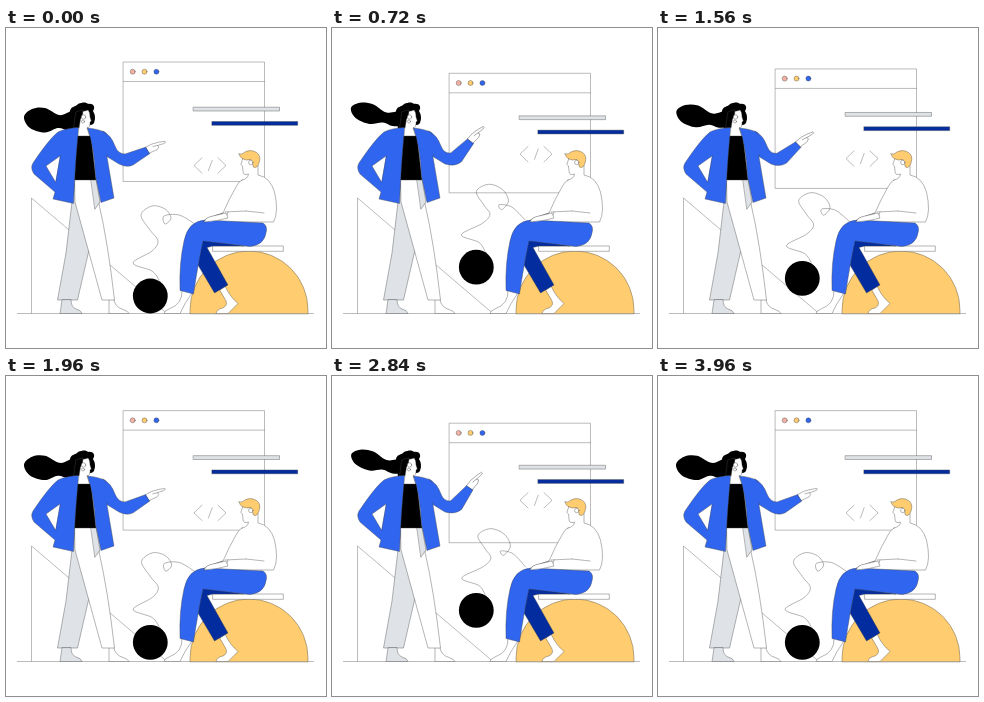
Recreate the animation shown at these times as an HTML page. Size 320 by 320 pixels, loop 4 s.

```html
<!DOCTYPE html>
<html lang="en">
<head>
<meta charset="utf-8">
<title>Presentation</title>
<style>
  html, body { margin: 0; width: 100%; height: 100%; overflow: hidden; background: #fff; }
  svg { display: block; width: 100vw; height: 100vh; }
  .ink { stroke: #444; stroke-width: .4; stroke-linejoin: round; stroke-linecap: round; }
  .thin { stroke: #777; stroke-width: .5; fill: none; }
  .none { fill: none; }
  .white { fill: #fff; }
  .blue { fill: #3065ef; }
  .navy { fill: #032d9f; }
  .gold { fill: #ffcd70; }
  .gray { fill: #dfe2e6; }
  .pink { fill: #f3b3a4; }
</style>
</head>
<body>
<svg viewBox="0 0 320 320">
  <path class="thin" d="M11 285.5H308"/>
  <path class="thin" d="M25.5 285.5V170L161 285.5"/>

  <g id="panel" class="ink">
    <path class="thin" d="M117.5 34H258.5V153.5H117.5ZM117.5 53.5H258.5"/>
    <circle class="pink" cx="126.7" cy="43.7" r="2.5"/>
    <circle class="gold" cx="138.5" cy="43.7" r="2.5"/>
    <circle class="blue" cx="150.4" cy="43.7" r="2.5"/>
  </g>
  <g id="bars" class="ink">
    <rect class="gray" x="187.5" y="79.2" width="86" height="3.8"/>
    <rect class="navy" x="206" y="93.5" width="85.7" height="3.8"/>
  </g>
  <path id="code" class="thin" d="M196.3 129.5L188 137.5L196.3 145.5M206.3 132L202.3 143M211.7 129.5L220 137.5L211.7 145.5"/>

  <circle id="ball" cx="144.3" cy="268" r="17.4"/>
  <path id="string" class="ink none"/>

  <!-- seated man -->
  <g class="ink">
    <path class="gold" d="M184 285.5V282A59 59 0 0 1 302 282V285.5Z"/>
    <rect class="white" x="207" y="218" width="70.3" height="5.3"/>
    <path class="white" d="M214 262L219 258Q224 269 232 275.5L222 285.5H210Q211 281 217 280Q223 277 219 271Z"/>
    <path class="white" d="M176 262Q177 276 163 281Q158 283 158 285.5H174Q178 276 186 265Z"/>
    <path class="navy" d="M195 211L238 218H207L201 219.5L222 257L208.5 265L192 237Z"/>
    <path class="white" d="M236 152Q242 151 242.5 146Q237 148 237 143L236.5 138L234.8 136.5L237 130L248 128L252 138V147Q264 149 268.5 164Q273 184 267.5 194H199Q199 190 205 189L217 185Q223 171 230 159Q233 153 236 152Z"/>
    <path class="none" d="M217 185L200 191M219 184L240 183M222 184L220 190M240 183L258 185"/>
    <path class="gold" d="M233 126Q234 129 236 130.5Q240 133 245 131.5L247.5 139Q251 141 253 135Q255.500 128 250.500 124.500Q245 121 239 124Q236 127 233 126Z"/>
    <circle class="white" cx="244.8" cy="134.5" r="2.2"/>
    <path class="blue" d="M199 192L257 195Q262 198 260 205Q258 217 244 218.5L197 213Q192 236 187.5 266L174 262.5Q173 235 178 213Q182 193 199 192Z"/>
    <path class="white" d="M198 194Q200 189 207 188L220 185L222 190Q212 193 198 194Z"/>
  </g>

  <!-- standing woman -->
  <g class="ink">
    <path class="gray" d="M66 174L60 225L51.5 272H71.5L83 222L93 174L89 151H70Z"/>
    <path class="gray" d="M56 272L54 285.5H76Q75 282 70 281Q65 279 65 272Z"/>
    <path class="white" d="M103 272V285.5H123Q122 283 117 281.5Q109 279 108 272Z"/>
    <path class="white" d="M69 151H87L93 176Q102 215 108.500 272H96L69 174Z"/>
    <path class="gray" d="M85 151H90L94 174L89 181Z"/>
  </g>
  <path id="pony"/>
  <path d="M64 84C64 78 70 79 72 76C77 74 80 74 82 76C87 75 90 79 87 83Q90 88 88.500 93Q88 97 84 97L75 102L66 101Z"/>
  <g class="ink">
    <path class="white" d="M73 84Q80 83 82 82Q84 84 84 89L85.300 93L84 94Q84.500 99.500 81 100L84 109H71.500V98Z"/>
    <path d="M70 84Q74 82 77 82Q77 88 74.500 91L73 100H68Z"/>
    <circle class="white" cx="77.5" cy="89" r="2.2"/>
    <circle class="none" cx="77" cy="93.5" r="1.5"/>
    <path d="M70 108H85L90 152H68Z"/>
    <path id="arm" class="blue"/>
    <g id="hand">
      <path class="white" d="M140 119L146 116Q152 114 159 113.3Q160.5 114.5 158 115.5L151.5 117.5L153 119Q152 122 148 123L143.5 125Z"/>
      <path class="none" d="M151.5 117.5L147 118.5"/>
    </g>
    <path class="blue" d="M72.5 99.5Q60 100 52 104Q43 111 27 135Q24 140 28 146L49 164L47 171L67.5 175.5Q69 140 71 118Z"/>
    <path class="white" d="M54 128L40 138L49.500 154Z"/>
    <path class="blue" d="M81.5 100Q93 101 99 104.5L102 112L101 129L108 170L95 174.5L89.5 148Q88 118 81.5 100Z"/>
    <path class="blue" stroke="none" d="M97 104L103 110L102.500 127L99 125Z"/>
  </g>
</svg>
<script>
const HALF = 1000, STEP = 40;
const $ = id => document.getElementById(id);
const num = v => v.toFixed(2);
const put = (id, value) => $(id).setAttribute("transform", value);
const move = (id, dy) => put(id, `translate(0 ${num(dy)})`);

// Smooth curve through points (Catmull-Rom as Beziers)
function curve(pts, closed) {
  const n = pts.length;
  const at = i => closed ? pts[(i + n) % n] : pts[Math.max(0, Math.min(n - 1, i))];
  let d = "M" + pts[0].map(num);
  for (let i = 0; i < (closed ? n : n - 1); i++) {
    const [a, b, c, e] = [at(i - 1), at(i), at(i + 1), at(i + 2)];
    d += "C" + [0, 1].map(k => num(b[k] + (c[k] - a[k]) / 6)) +
      " " + [0, 1].map(k => num(c[k] - (e[k] - b[k]) / 6)) + " " + c.map(num);
  }
  return d;
}

function rotate([x, y], deg, [cx, cy]) {
  const a = deg * Math.PI / 180, c = Math.cos(a), s = Math.sin(a);
  return [cx + (x - cx) * c - (y - cy) * s, cy + (x - cx) * s + (y - cy) * c];
}

const elbow = [116, 126];
const cord = [
  [153, 252], [146, 243], [127, 235], [146, 223], [152, 213], [144, 202], [135, 187],
  [146, 178], [159, 181], [165, 190], [159, 196], [158, 188], [173, 187], [189, 196]
];

$("pony").setAttribute("d", curve([
  [74, 77], [63, 84], [53, 87], [39, 80], [26, 81], [18, 89],
  [24, 100], [39, 104.5], [52, 100], [64, 102], [80, 94]
], true));

// The cord rises with the ball at one end and hardly moves at the other
function string(p) {
  return curve(cord.map(([x, y], i) => {
    const s = i / (cord.length - 1);
    return [x + 16 * p * Math.sin(2.8 * s ** 1.4), y - 40 * p * (1 - .85 * s * s)];
  }));
}

function arm(deg) {
  const r = (x, y, k = 1) => rotate([x, y], deg * k, elbow).map(num);
  return `M97 103Q105 107 109 118Q112 126 ${r(119, 126)}L${r(140, 119)}L${r(144, 125.5)}` +
    `L${r(127, 137, .7)}Q${r(121, 140, .4)} 113 136L100 128Z`;
}

function draw(t) {
  const phase = t / HALF % 2;
  const p = phase < 1 ? phase : 2 - phase;
  move("panel", 15.7 * p);
  move("code", -15.7 * p);
  move("bars", 12 * p);
  move("ball", -40 * p);
  put("pony", `translate(72 90) rotate(${num(14 * p)}) scale(1 ${num(1 - .25 * p)}) translate(-72 -90)`);
  put("hand", `rotate(${num(-30 * p)} ${elbow})`);
  $("arm").setAttribute("d", arm(-30 * p));
  $("string").setAttribute("d", string(p));
}

function tick() {
  draw(Math.floor(performance.now() / STEP) * STEP);
  requestAnimationFrame(tick);
}
draw(0);
requestAnimationFrame(tick);
</script>
</body>
</html>
```
